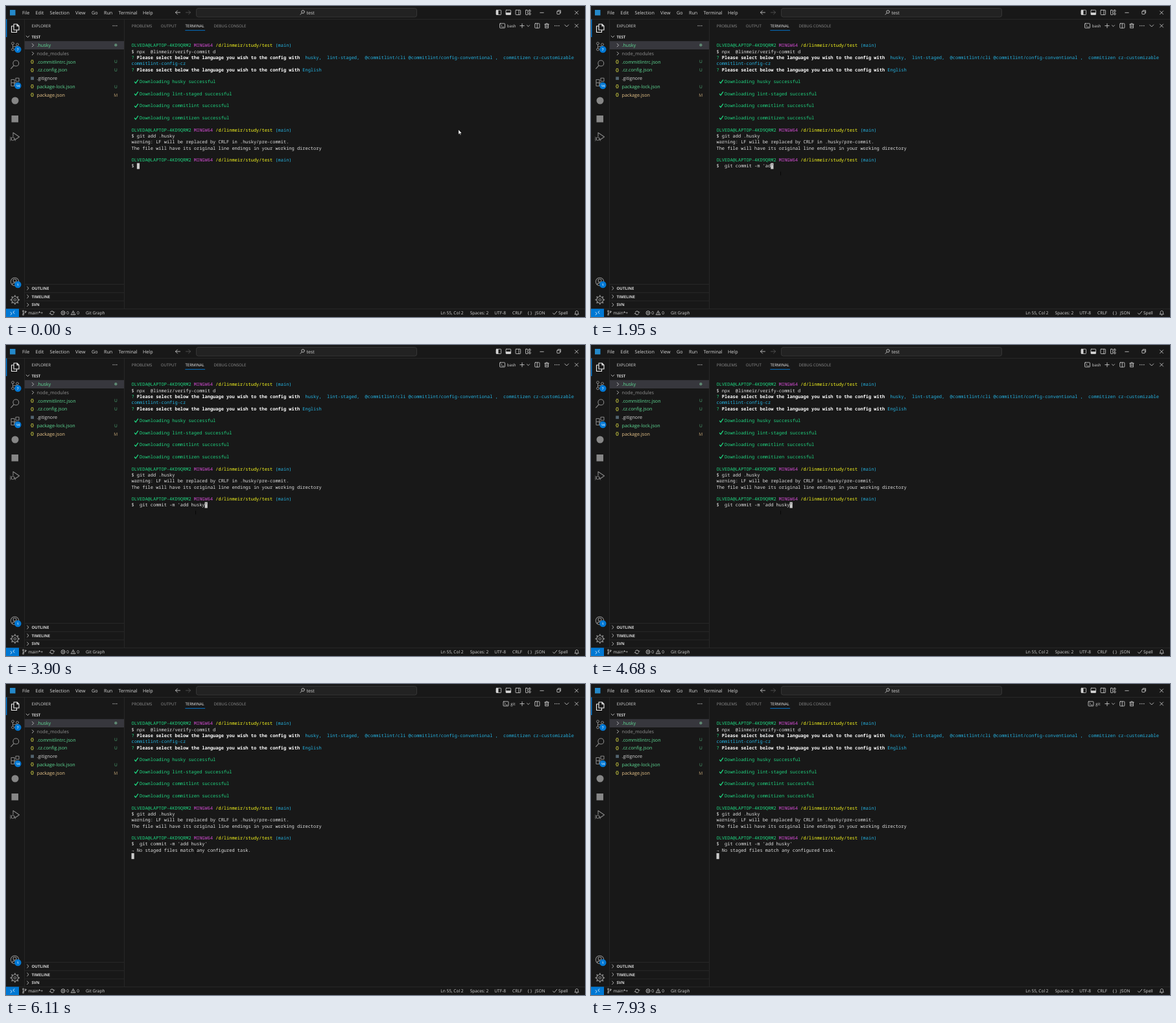
Recreate the animation shown at these times as an HTML page with a canvas. Size 893x480 px, loop 8000 ms.

```html
<!DOCTYPE html>
<html lang="en">
<head>
<meta charset="utf-8">
<title>Terminal commit</title>
<style>
html, body { margin: 0; width: 100%; height: 100%; overflow: hidden; background: #181818; }
canvas { display: block; width: 893px; height: 480px; }
</style>
</head>
<body>
<canvas id="stage"></canvas>
<script>
const W = 893, H = 480, LOOP = 8000;
const UI = '"Open Sans", "Noto Sans", sans-serif';
const MONO = '"Noto Sans Mono", "DejaVu Sans Mono", monospace';
const BG = '#181818', LINE = '#2b2b2b', FG = '#d6d6d6', DIM = '#909090', BLUE = '#0078d4';
const TEXT = '#e2e2e2', GREEN = '#1fd882', CYAN = '#25b4e4', PINK = '#d24cd2', YELLOW = '#fcfc1e';
const COL = 4.187, ROW = 9.3, LEFT = 193.5, TOP = 61;

const dpr = window.devicePixelRatio || 1;
function setup(canvas) {
  canvas.width = W * dpr;
  canvas.height = H * dpr;
  const ctx = canvas.getContext('2d');
  ctx.scale(dpr, dpr);
  ctx.textRendering = 'geometricPrecision';
  ctx.lineCap = ctx.lineJoin = 'round';
  return ctx;
}
const stage = setup(document.getElementById('stage'));
const base = setup(document.createElement('canvas'));
let g = base;

// ---- drawing helpers ----
function rect(x, y, w, h, color) {
  g.fillStyle = color;
  g.fillRect(x, y, w, h);
}
function box(x, y, w, h, color, r = 0, width = 0.8) {
  g.strokeStyle = color;
  g.lineWidth = width;
  g.beginPath();
  g.roundRect(x, y, w, h, r);
  g.stroke();
}
function dot(x, y, r, color) {
  g.fillStyle = color;
  g.beginPath();
  g.arc(x, y, r, 0, 7);
  g.fill();
}
function ring(x, y, r, color, width = 0.8, from = 0, to = Math.PI * 2) {
  g.strokeStyle = color;
  g.lineWidth = width;
  g.beginPath();
  g.arc(x, y, r, from, to);
  g.stroke();
}
// Strokes an SVG path placed at (x, y).
function path(x, y, d, color = FG, width = 0.8) {
  g.save();
  g.translate(x, y);
  g.strokeStyle = color;
  g.lineWidth = width;
  g.stroke(new Path2D(d));
  g.restore();
}
function label(s, x, y, size = 7.2, color = FG, weight = 400, align = 'left') {
  g.font = `${weight} ${size}px ${UI}`;
  g.fillStyle = color;
  g.textAlign = align;
  g.fillText(s, x, y + size * 0.345);
}
// Writes on the terminal grid.
function put(s, col, row, color = TEXT, weight = 500) {
  g.font = `${weight} 6.98px ${MONO}`;
  g.fillStyle = color;
  g.textAlign = 'left';
  for (let i = 0; i < s.length; i++) {
    if (s[i] !== ' ') g.fillText(s[i], LEFT + (col + i) * COL, TOP + row * ROW + 2.4);
  }
}
function block(col, row, under = '') {
  rect(LEFT + col * COL, TOP + row * ROW - 4.5, COL, 9.1, '#cccccc');
  put(under, col, row, BG);
}
const down = 'M-3 -1.5 L0 1.5 L3 -1.5', small = 'M-2 -1 L0 1 L2 -1';
const closed = 'M-1.2 -2.4 L1.2 0 L-1.2 2.4', cross = 'M-2.5 -2.5 L2.5 2.5 M2.5 -2.5 L-2.5 2.5';

// ---- window parts ----
function titleBar() {
  rect(0, 20, W, 0.8, LINE);
  rect(6, 6, 8.5, 8.5, '#2489ca');
  const menus = [['File', 25], ['Edit', 45.5], ['Selection', 67.5], ['View', 107],
    ['Go', 132], ['Run', 151], ['Terminal', 173.5], ['Help', 211]];
  for (const [s, x] of menus) label(s, x, 10.5);
  path(265, 10, 'M3.5 0 H-3.5 M-0.5 -3 L-3.5 0 L-0.5 3');
  path(281, 10, 'M-3.5 0 H3.5 M0.5 -3 L3.5 0 L0.5 3', '#5a5a5a');
  g.fillStyle = '#222222';
  g.beginPath();
  g.roundRect(293.5, 3.5, 340, 13.5, 3);
  g.fill();
  box(293.5, 3.5, 340, 13.5, '#3c3c3c', 3);
  ring(458, 9, 2.3, FG);
  path(456.3, 10.8, 'M0 0 L-2.3 2.5');
  label('test', 463.5, 10.2, 7);
  for (const x of [756, 771, 786]) box(x, 6.3, 7.6, 7.2, FG, 0.8);
  rect(756, 6.3, 3.4, 7.2, FG);
  rect(771, 10.2, 7.6, 3.3, FG);
  path(791, 6.3, 'M0 0 V7.2');
  box(801.5, 6.3, 3.2, 7.2, FG, 0.6);
  box(806.5, 6.3, 2.6, 2.6, FG, 0.6);
  box(806.5, 10.9, 2.6, 2.6, FG, 0.6);
  path(826.5, 10.3, 'M-2.7 0 H2.7');
  box(849.8, 8.2, 4.4, 4.4, FG, 0.5);
  path(851.3, 8, 'M0 -1.2 H4.2 V3');
  path(880, 10.3, cross);
}

function badge(y, s) {
  dot(18.3, y, 5.2, BLUE);
  label(s, 18.3, y, 5, '#ffffff', 600, 'center');
}

function activityBar() {
  rect(28, 20, 0.8, 447, LINE);
  rect(0, 20.5, 1.4, 27.5, BLUE);
  path(14, 34, 'M-2 -6 H3 L6 -3 V3 H-2 Z M3 -6 V-3 H6 M-2 -3 H-5.5 V6.5 H2.5 V3', '#f0f0f0', 1.1);
  const c = '#868686';
  ring(10.5, 57.8, 1.9, c, 1);
  ring(10.5, 67, 1.9, c, 1);
  ring(17.5, 59.5, 1.9, c, 1);
  path(10.5, 59.7, 'M0 0 V5.4 M0 3.5 C1 2 6 4 7 1.7', c, 1);
  badge(67, '7');
  ring(15.3, 88.4, 4.4, c, 1.1);
  path(12, 91.8, 'M0 0 L-4.3 4.8', c, 1.2);
  box(8, 113.5, 5, 5, c, 0.5, 1.1);
  box(8, 118.5, 5, 5, c, 0.5, 1.1);
  box(13, 118.5, 5, 5, c, 0.5, 1.1);
  box(15, 111.2, 5, 5, c, 0.5, 1.1);
  badge(123, '14');
  dot(14, 146, 5.5, c);
  rect(8.5, 169, 10.5, 10.5, c);
  path(14, 202, 'M-3 -1 V-6.5 L6.5 0 L0 4.5', c, 1.1);
  ring(10.5, 205, 2.5, c, 1);
  path(10.5, 205, 'M-4.3 -2.5 L-2.2 -1.2 M-4.5 0.3 H-2.5 M-4.3 3 L-2.2 1.5 M2.5 0.3 H4.5 M4.3 3 L2.2 1.5', c, 0.8);
  ring(13.5, 425.5, 6.2, c, 1.1);
  ring(13.5, 423.7, 2.4, c, 1.1);
  path(13.5, 427, 'M-4.2 3 C-3 -0.5 3 -0.5 4.2 3', c, 1.1);
  badge(430, '1');
  ring(13.8, 453.5, 5, c, 1.2);
  ring(13.8, 453.5, 1.8, c, 1.1);
  for (let i = 0; i < 8; i++) {
    const a = i * Math.PI / 4, x = Math.cos(a), y = Math.sin(a);
    path(13.8, 453.5, `M${x * 5.3} ${y * 5.3} L${x * 6.5} ${y * 6.5}`, c, 1.9);
  }
}

function sideBar() {
  rect(182, 20, 0.8, 447, LINE);
  label('EXPLORER', 39.5, 30.7, 6.15);
  for (const x of [165.2, 168, 170.8]) dot(x, 30.5, 0.65, FG);
  path(33.5, 47.3, 'M-2.3 -1.2 L0 1.2 L2.3 -1.2');
  label('TEST', 39.5, 47.5, 6.1, FG, 700);
  rect(28.8, 54.2, 153.2, 12.8, '#37373d');
  const add = '#5fdc96', mod = '#ecc88c';
  path(41.5, 60.5, closed);
  path(41.5, 73.3, closed);
  label('.husky', 47.5, 60.6, 7.2, add);
  dot(169.3, 60.3, 2.2, '#5f8873');
  label('node_modules', 47.5, 73.4, 7.2, DIM);
  const files = [['.commitlintrc.json', add, 'U'], ['.cz.config.json', add, 'U'], ['.gitignore', FG, ''],
    ['package-lock.json', add, 'U'], ['package.json', mod, 'M']];
  files.forEach(([name, color, mark], i) => {
    const y = 86.1 + i * 12.8;
    if (name.endsWith('json')) label('{}', 40.5, y - 0.5, 7, '#dede45', 600, 'center');
    else rect(38.2, y - 2.4, 4.8, 4.8, '#52646f');
    label(name, 47.5, y, 7.2, color);
    g.globalAlpha = 0.75;
    label(mark, 169.3, y, 6.6, color, 400, 'center');
    g.globalAlpha = 1;
  });
  ['OUTLINE', 'TIMELINE', 'SVN'].forEach((s, i) => {
    const y = 435.6 + i * 12.8;
    rect(28.8, y - 6.5, 153.2, 0.8, LINE);
    path(33.8, y, closed);
    label(s, 39.5, y, 6.1, FG, 700);
  });
}

function statusBar() {
  const y = 473.7, size = 6.6;
  rect(0, 467, W, 0.8, LINE);
  rect(0, 467.3, 20, 12.7, BLUE);
  path(10, y, 'M-3 -1 L-0.8 1 L-3 3 M3 -3 L0.8 -1 L3 1', '#ffffff');
  ring(26.5, 470.8, 1, FG, 0.7);
  ring(26.5, 476.4, 1, FG, 0.7);
  ring(30.2, 471.8, 1, FG, 0.7);
  path(26.5, 471.8, 'M0 0 V3.6 M0 2.6 C1 1.6 3.7 2.8 3.7 1', FG, 0.7);
  ring(71, y, 2.8, FG, 0.8, 0.4, 2.9);
  ring(71, y, 2.8, FG, 0.8, 3.5, 6);
  path(71, y, 'M-4 1.3 L-2.8 0.5 L-1.6 1.6 M4 -1.3 L2.8 -0.5 L1.6 -1.6', FG, 0.7);
  ring(88, y, 3, FG);
  path(88, y, 'M-1.2 -1.2 L1.2 1.2 M1.2 -1.2 L-1.2 1.2', FG, 0.7);
  path(103.8, y, 'M0 -3 L3.2 2.8 H-3.2 Z M0 -0.9 V0.8 M0 1.8 V1.9', FG, 0.7);
  const items = [['main*+', 34.2], ['0', 93.3], ['0', 109.3], ['Git Graph', 123], ['Ln 55, Col 2', 670.3],
    ['Spaces: 2', 715.7], ['UTF-8', 753.3], ['CRLF', 781], ['{ }', 804.5], ['JSON', 816], ['Spell', 852]];
  for (const [s, x] of items) label(s, x, y, size);
  path(846.5, y, 'M-3 0.3 L-1 2.4 L3.2 -2.4');
  path(880.3, y, 'M-3 2 H3 L2.1 0.6 V-1 C2.1 -4 -2.1 -4 -2.1 -1 V0.6 Z M-0.8 3.3 H0.8', FG, 0.75);
}

function panelBar() {
  const tabs = [['PROBLEMS', 193.8, DIM], ['OUTPUT', 238.8, DIM], ['TERMINAL', 276.5, '#f0f0f0'], ['DEBUG CONSOLE', 320.5, DIM]];
  for (const [s, x, color] of tabs) label(s, x, 30.8, 6.08, color);
  rect(276.3, 37.2, 30.8, 0.9, BLUE);
  path(796, 30.5, 'M-3.2 0 H3.2 M0 -3.2 V3.2');
  path(805.5, 30.7, small);
  box(815.7, 27, 7.2, 7, FG, 0.7);
  path(819.3, 27, 'M0 0 V7');
  path(834, 30.5, 'M-3.3 -2.3 H3.3 M-1.2 -2.3 V-3.5 H1.2 V-2.3 M-2.5 -2.3 V3.5 H2.5 V-2.3 M-0.9 -0.6 V2 M0.9 -0.6 V2', FG, 0.75);
  for (const x of [846.8, 849.8, 852.8]) dot(x, 30.5, 0.7, FG);
  path(864.7, 30.5, down);
  path(880, 30.5, cross);
}

function prompt(row) {
  put('OLVEDA@LAPTOP-4KD9QRM2', 0, row, GREEN);
  put('MINGW64', 23, row, PINK);
  put('/d/linmeir/study/test', 31, row, YELLOW);
  put('(main)', 53, row, CYAN);
}

function history() {
  prompt(0);
  put('$ npx  @linmeir/verify-commit d', 0, 1);
  const ask = 'Please select below the language you wish to the config with';
  for (const row of [2, 4]) {
    put('?', 0, row, GREEN);
    put(ask, 2, row, '#ffffff', 700);
  }
  put('husky,  lint-staged,  @commitlint/cli @commitlint/config-conventional ,  commitizen cz-customizable', 64, 2, CYAN);
  put('commitlint-config-cz', 0, 3, CYAN);
  put('English', 63, 4, CYAN);
  ['husky', 'lint-staged', 'commitlint', 'commitizen'].forEach((name, i) => {
    const row = 6 + i * 2;
    path(201, TOP + row * ROW, 'M-2.6 0.4 L-1 2.4 L2.6 -2.7', GREEN, 1.3);
    put(`Downloading ${name} successful`, 3, row, GREEN);
  });
  prompt(14);
  put('$ git add .husky', 0, 15);
  put('warning: LF will be replaced by CRLF in .husky/pre-commit.', 0, 16);
  put('The file will have its original line endings in your working directory', 0, 17);
  prompt(19);
  put('$', 0, 20);
}

// ---- timeline ----
const MOVE = 260, ARRIVE = 720, PASTE = 850, BACK = 1300;
const TYPE = 1620, KEY = 270, ENTER = 5320, REPLY = 6040;

function shell(t) {
  const running = t >= ENTER + 100, x = running ? 767 : 761.5;
  box(x, 27, 8, 7, FG, 0.8);
  path(x + 2.2, 30.5, 'M-0.3 -1.5 L1.2 0 L-0.3 1.5 M2 1.8 H4', FG, 0.7);
  label(running ? 'git' : 'bash', x + 11.3, 30.8, 6.1);
}

function command(t) {
  if (t < PASTE) return block(2, 20);
  const count = t < TYPE ? 0 : Math.floor((t - TYPE) / KEY) + 1;
  const message = 'add husky'.slice(0, count);
  put(`git commit -m '${message}'`, 3, 20);
  if (t < BACK) block(19, 20);
  else if (t < ENTER) block(18 + message.length, 20, "'");
  else if (t < REPLY) block(0, 21);
  else {
    put('→ No staged files match any configured task.', 0, 21);
    block(0, 22);
  }
}

// The arrow becomes a dark text cursor once it moves over the terminal.
function pointer(t) {
  const p = Math.min(1, Math.max(0, (t - MOVE) / (ARRIVE - MOVE)));
  const e = p * p * (3 - 2 * p);
  g.save();
  g.translate(697.8 - 405.3 * e, 190.8 + 67.7 * e);
  if (p > 0) path(0, 0, 'M0 -2.5 V2.5', '#050505');
  else {
    const arrow = new Path2D('M0 0 V7.6 L1.8 6 L3 8.8 L4.2 8.3 L3 5.6 H5.4 Z');
    g.fillStyle = '#ffffff';
    g.strokeStyle = '#000000';
    g.lineWidth = 0.6;
    g.fill(arrow);
    g.stroke(arrow);
  }
  g.restore();
}

rect(0, 0, W, H, BG);
titleBar();
activityBar();
sideBar();
statusBar();
panelBar();
history();
g = stage;

function frame(now) {
  const t = now % LOOP;
  g.drawImage(base.canvas, 0, 0, W, H);
  shell(t);
  command(t);
  pointer(t);
  requestAnimationFrame(frame);
}
requestAnimationFrame(frame);
</script>
</body>
</html>
```
